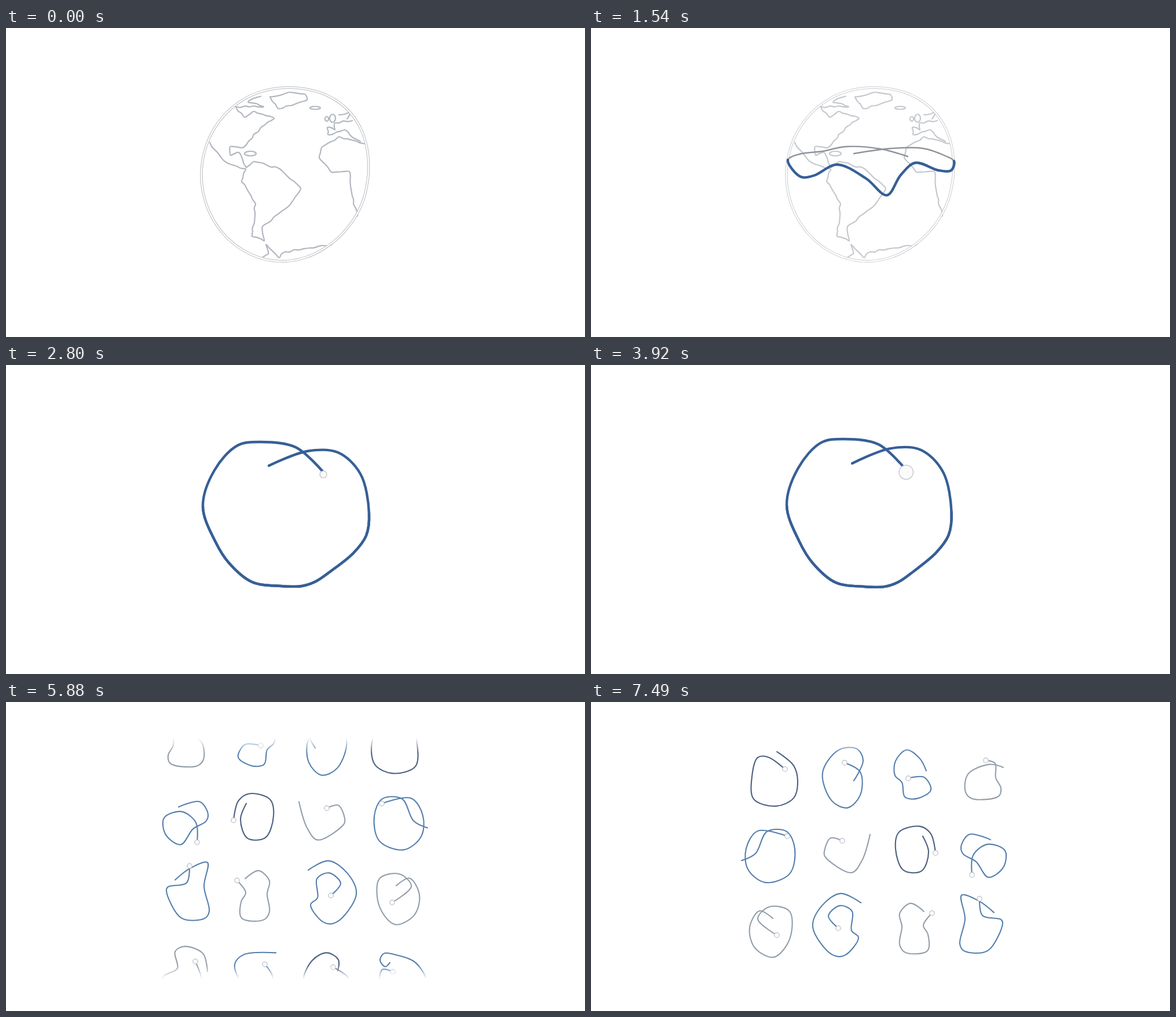
An HTML page with a canvas for the animation above (8050 ms loop, 1000 by 534 pixels).

```html
<!DOCTYPE html>
<html lang="en">
<head>
<meta charset="utf-8">
<title>Orbit sketches</title>
<style>
html, body { margin: 0; width: 100%; height: 100%; overflow: hidden; background: #fff; }
canvas { display: block; width: 1000px; height: 534px; }
</style>
</head>
<body>
<canvas id="stage" width="1000" height="534"></canvas>
<script>
const ctx = document.getElementById('stage').getContext('2d');
const LOOP = 8050, STEP = 70, LAST = 7490;
const BLUE = '#365f96', SOFT = '#557fad', NAVY = '#4b5f80', GREY = '#929eaa', COAST = '#b2b6be';
const MIRROR = 988, SHEET = 525;

const parse = s => s.trim().split(/\s+/).map(p => p.split(',').map(Number));
const lerp = (a, b, k) => a + (b - a) * k;
const span = (t, a, b) => Math.min(1, Math.max(0, (t - a) / (b - a)));
const inOut = u => u < .5 ? 4 * u ** 3 : 1 - 4 * (1 - u) ** 3;
const dist = (p, q) => Math.hypot(q[0] - p[0], q[1] - p[1]);

let seed = 7;
const random = () => (seed = seed * 16807 % 2147483647) / 2147483647;

// Bezier handle at q, leaving towards r, for a centripetal spline
function handle(p, q, r) {
  const a = Math.sqrt(dist(p, q)), b = Math.sqrt(dist(q, r));
  if (!a) return q;
  return q.map((v, i) => (a * a * r[i] - b * b * p[i] +
    (2 * a * a + 3 * a * b + b * b) * v) / (3 * a * (a + b)));
}

// Spline through pts, optionally only from point a to point b
function curve(pts, a = 0, b = pts.length - 1) {
  const at = i => pts[Math.min(pts.length - 1, Math.max(0, i))];
  ctx.beginPath();
  ctx.moveTo(...at(a));
  for (let i = a; i < b; i++) {
    const q = at(i), r = at(i + 1);
    ctx.bezierCurveTo(...handle(at(i - 1), q, r), ...handle(at(i + 2), r, q), ...r);
  }
}

function stroke(color, width, alpha = 1) {
  ctx.globalAlpha = alpha;
  ctx.strokeStyle = color;
  ctx.lineWidth = width;
  ctx.stroke();
  ctx.globalAlpha = 1;
}

function head(x, y, r, alpha = 1) {
  ctx.beginPath();
  ctx.arc(x, y, r, 0, 7);
  ctx.globalAlpha = alpha;
  ctx.fillStyle = '#fbfbfc';
  ctx.fill();
  stroke('#bcbec6', 1.2, alpha);
}

// Adds small random bends along a rough line
function rugged(pts) {
  const out = [pts[0]];
  for (let i = 1; i < pts.length; i++) {
    const [p, q] = [pts[i - 1], pts[i]];
    const n = Math.max(1, Math.round(dist(p, q) / 8));
    for (let j = 1; j < n; j++) {
      out.push(p.map((v, k) => lerp(v, q[k], j / n) + (random() - .5) * 3));
    }
    out.push(q);
  }
  return out;
}

// Globe: an ellipse pushed out at upper right, flattened at lower right
const lobe = (a, dir) => Math.max(0, Math.cos(a - dir)) ** 6;
const rim = Array.from({ length: 25 }, (_, i) => {
  const a = i / 24 * 2 * Math.PI;
  const r = 1 + .07 * lobe(a, -.73) - .03 * lobe(a, .87);
  return [481 + 143.5 * r * Math.cos(a), 254 + 150 * r * Math.sin(a)];
});
const coasts = [
  '397,136 412,154 428,144 463,156 440,172 408,207 387,205 388,220 402,215 415,241',
  `415,241 428,231 472,243 509,277 490,306 443,343 446,368 425,360 431,304 407,265 414,244
   376,229 352,198`,
  '598,160 568,164 568,176 555,172 556,184 585,176 600,190 612,196',
  '619,200 575,188 545,207 541,224 562,249 593,248 598,290 607,325',
  '440,399 453,390 449,374 472,397 482,387 563,374',
  '398,136 445,136 418,128 440,118',
  '575,150 594,146 589,157',
  '456,119 490,111 517,115 520,124 470,139 456,119'
].map(s => rugged(parse(s)));
const islands = [[534, 138, 9, 2.5], [422, 217, 10, 4], [554, 157, 3, 4], [564, 156, 5, 7]];

function globe(alpha) {
  if (alpha <= 0) return;
  for (const c of coasts) { curve(c); stroke(COAST, 2.2, alpha); }
  for (const [x, y, rx, ry] of islands) {
    ctx.beginPath();
    ctx.ellipse(x, y, rx, ry, 0, 0, 7);
    stroke(COAST, 2.2, alpha);
  }
  curve(rim);
  stroke('#b8bbc2', 4.4, alpha);
  stroke('#fff', 2.4);
}

// Track key points: x, y seen from the side, y seen from above
const track = parse(`454,217,174 520,208,149 573,208,151 612,221,188 627,230,256 622,246,295
  600,246,325 560,233,357 535,254,374 511,289,382 475,260,382 425,236,375 385,255,342
  362,257,306 340,228,245 360,218,182 400,213,139 440,205,133 500,209,142 547,222,184`);
const MID = [483.5, 257.5], HOME = [307, 146], FRONT = [4, 14];

function mainTrack(t) {
  const tilt = inOut(span(t, 1680, 2770));
  const grow = inOut(span(t, 2770, 3430));
  const move = inOut(span(t, 3754, 4758));
  const show = span(t, 0, 840);
  const size = lerp(1, .302, move);
  const sx = lerp(1, 1.004, grow) * size, sy = lerp(1, 1.037, grow) * size;
  const cx = lerp(MID[0], HOME[0], move), cy = lerp(MID[1], HOME[1], move);
  const place = (x, y) => [cx + (x - MID[0]) * sx, cy + (y - MID[1]) * sy];
  const pts = track.map(([x, side, top]) => place(x, lerp(side, top, tilt)));
  const wide = lerp(4.4, 2.2, move);

  curve(pts);
  stroke('#8f939a', 2.4, show * (1 - tilt));
  stroke(BLUE, lerp(2.4, wide, tilt), tilt);
  curve(pts, ...FRONT);
  stroke(BLUE, wide, show);

  const dot = span(t, 2520, 2800) * 6 + grow * 6.4;
  if (dot > 0) head(...place(548, 189), dot * size, span(t, 2520, 2700));
}

// Small drawings as key points, tail first, head last
const tile = (color, s) => ({ color, pts: parse(s) });
const tiles = [
  tile(NAVY, '415,137 414,118 434,106 459,119 474,154 460,169 412,170 397,150 423,131'),
  tile(SOFT, '522,106 577,109 593,126 580,160 555,178 532,166 528,146 541,126'),
  tile(GREY, '640,138 648,107 680,95 696,104 692,133 716,147 714,162 660,178 650,155 661,121'),

  tile(GREY, '276,254 300,249 337,266 341,297 330,308 284,304 280,290 289,272 290,247 306,242'),
  tile(SOFT, `409,260 420,239 443,224 462,243 463,268 451,280 446,305 425,308 401,293 413,271
    440,273`),
  tile(SOFT, '534,277 518,242 529,222 560,224 588,263 572,312 545,324 523,302 523,262 550,246'),
  tile(NAVY, '667,227 638,251 631,280 638,307 668,321 707,309 710,270 700,237 683,236 653,257'),

  tile(SOFT, `298,379 335,370 349,392 345,404 323,417 302,444 276,427 273,398 303,387 328,406
    330,440`),
  tile(NAVY, '415,373 405,400 417,433 448,432 462,395 456,366 420,356 401,369 393,402'),
  tile(GREY, '506,370 520,415 538,436 584,408 585,399 574,376 554,381'),
  tile(SOFT, `728,415 704,403 684,365 650,365 636,395 645,438 687,453 717,430 720,394 700,364
    649,373`),

  tile(SOFT, `292,505 318,485 348,475 342,516 351,559 344,571 303,571 277,523 280,517 312,510
    317,481`),
  tile(GREY, '413,503 436,489 455,507 451,529 455,560 445,574 407,571 406,543 414,527 399,506'),
  tile(SOFT, `522,488 557,472 590,494 605,530 571,578 550,579 526,548 538,536 537,503 558,493
    578,511 561,532`),
  tile(GREY, '674,515 697,502 714,531 705,566 672,582 645,551 645,503 680,495 700,516 667,544')
];
// Takes the main track's place on the second sheet
const spare = tile(SOFT, `325,123 333,130 342,119 335,107 313,110 282,122 263,153 276,166
  323,183 341,172 338,135 320,139`);

function drawTile({ color, pts }, alpha = 1) {
  curve(pts);
  stroke(color, 2.1, alpha);
  head(...pts[pts.length - 1], 4.2, alpha);
}

function scrolled(t) {
  const dt = Math.max(0, t - 5110), ease = 182, speed = .291;
  return speed * (dt < ease ? dt * dt / (2 * ease) : dt - ease / 2);
}

function fade(y0, y1) {
  const g = ctx.createLinearGradient(0, y0, 0, y1);
  g.addColorStop(0, '#fff');
  g.addColorStop(1, 'rgba(255,255,255,0)');
  ctx.fillStyle = g;
  ctx.fillRect(0, Math.min(y0, y1), 1000, Math.abs(y1 - y0));
}

// Two sheets of drawings, the second one mirrored, scroll up behind a soft window
function sheets(t) {
  ctx.save();
  ctx.beginPath();
  ctx.rect(0, 62, 1000, 417);
  ctx.clip();
  for (const k of [0, 1]) {
    ctx.save();
    ctx.translate(k * MIRROR, k * SHEET - scrolled(t));
    ctx.scale(1 - 2 * k, 1);
    if (k) drawTile(spare);
    else mainTrack(t);
    tiles.forEach((d, i) => {
      const begin = 4270 + Math.min(i, 10) * 25;
      drawTile(d, span(t, begin, begin + 500));
    });
    ctx.restore();
  }
  fade(62, 88);
  fade(479, 455);
  ctx.restore();
}

function draw(t) {
  ctx.fillStyle = '#fff';
  ctx.fillRect(0, 0, 1000, 534);
  ctx.lineCap = ctx.lineJoin = 'round';
  if (t < 4270) {
    globe(lerp(1, .75, span(t, 70, 1540)) * (1 - span(t, 1540, 2660)));
    mainTrack(t);
  } else {
    sheets(t);
  }
}

const start = performance.now();
function tick(now) {
  const t = Math.max(0, now - start) % LOOP;
  draw(Math.min(LAST, Math.floor(t / STEP) * STEP));
  requestAnimationFrame(tick);
}
draw(0);
requestAnimationFrame(tick);
</script>
</body>
</html>
```
